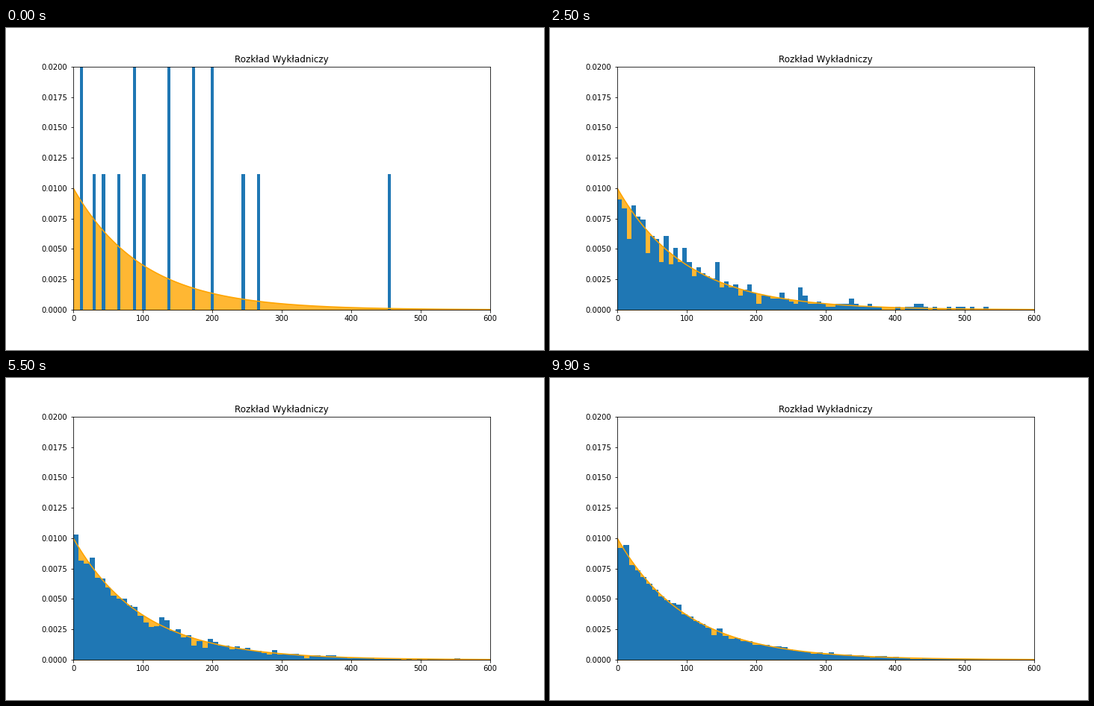
A matplotlib script for the animation above (10 s loop, 720 px wide and 432 px high).

```python
import numpy as np
import matplotlib.pyplot as plt
from matplotlib.animation import FuncAnimation

FRAMES, INTERVAL = 100, 100
BINS, SCALE = 100, 100

# Largest draw at a few steps, interpolated in between
MAX_STEPS = [0, 6, 17, 34, 55, 71, 99]
MAX_DRAWS = [457, 248, 625, 715, 773, 827, 844]


def pdf(x):
    return np.exp(-x / SCALE) / SCALE


def cdf(x):
    return 1 - np.exp(-x / SCALE)


def histogram(i):
    """Bin edges and densities of the sample drawn at step i."""
    n = 20 + i * i
    low = 2 * SCALE / n
    high = np.interp(i, MAX_STEPS, MAX_DRAWS)
    u = np.random.default_rng(i).uniform(cdf(low), cdf(high), n)
    draws = -SCALE * np.log(1 - u)
    draws[:2] = low, high
    density, edges = np.histogram(draws, BINS, (low, high), density=True)
    return edges, density


fig, ax = plt.subplots(figsize=(10, 6), dpi=72)
fig.subplots_adjust(left=0.125, right=0.9, bottom=0.125, top=0.88)

x = np.linspace(0, 600, 601)
ax.fill_between(x, pdf(x), color="orange", alpha=0.8)
bars = ax.bar(np.arange(BINS), np.zeros(BINS), align="edge", color="C0")
ax.plot(x, pdf(x), color="orange", lw=1.5)
ax.set(xlim=(0, 600), ylim=(0, 0.02), title="Rozkład Wykładniczy")
ax.tick_params(axis="y", pad=4.5)


def update(i):
    edges, density = histogram(i)
    for bar, left, width, height in zip(bars, edges, np.diff(edges), density):
        bar.set(x=left, width=width, height=height)
    return bars.patches


anim = FuncAnimation(fig, update, frames=FRAMES, interval=INTERVAL,
                     init_func=lambda: update(0), repeat=True, repeat_delay=0)
plt.show()
```
